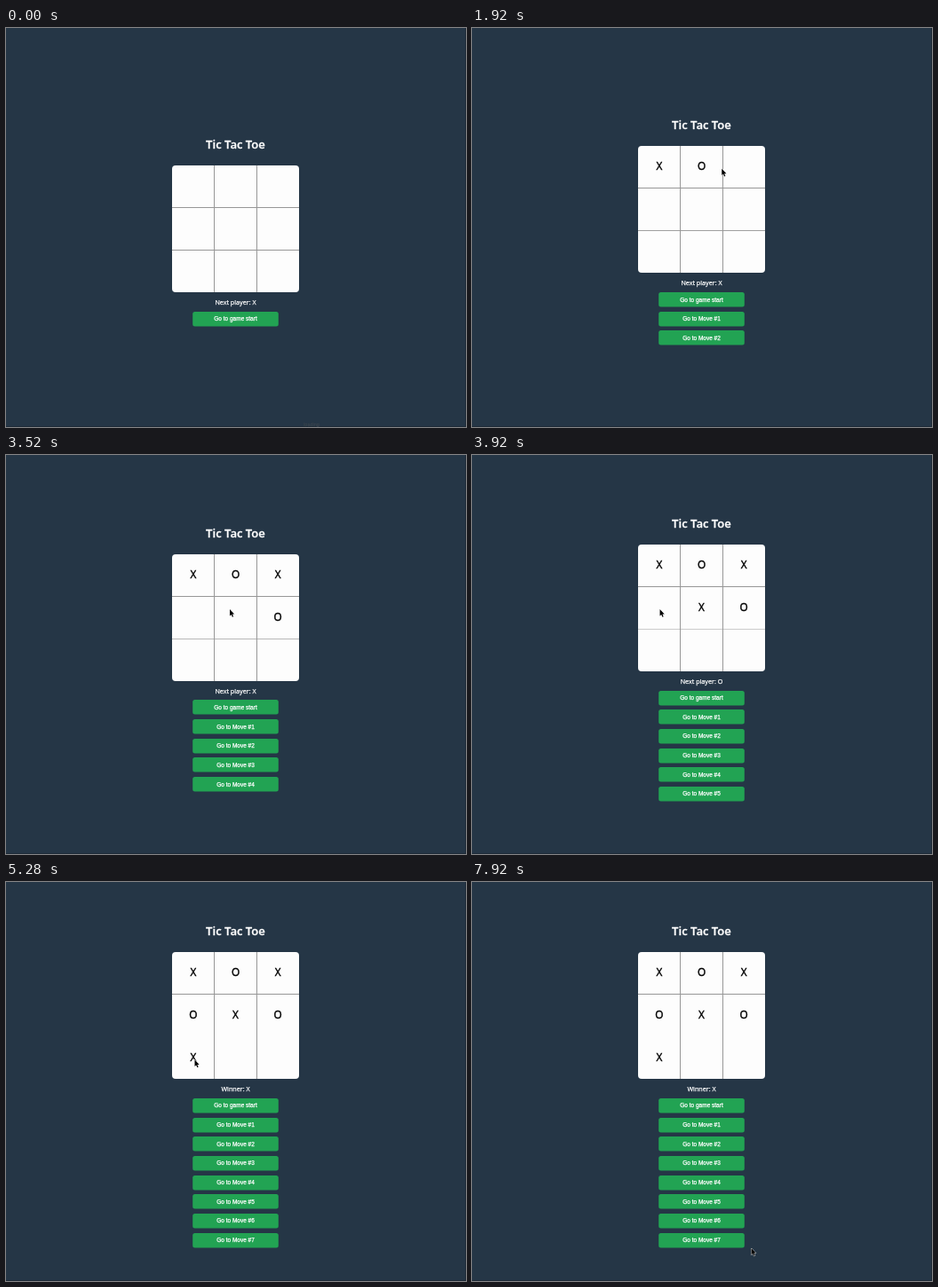
Animation, 518 px wide and 450 px high, one loop 8 s. Source, as an HTML page with a canvas:

```html
<!DOCTYPE html>
<html lang="en">
<head>
<meta charset="utf-8">
<title>Tic Tac Toe</title>
<style>
  html, body { margin: 0; width: 100%; height: 100%; overflow: hidden; background: #253646; }
  canvas { display: block; width: 518px; height: 450px; }
</style>
</head>
<body>
<canvas id="stage"></canvas>
<script>
const W = 518, H = 450, LOOP = 8000, STEP = 80;
const LEFT = 187, SIZE = 143, CELL = SIZE / 3, MID = 258.5;
const ROW = 21.67;
const SANS = '"Open Sans", "Noto Sans", sans-serif';
const ARIAL = '"Liberation Sans", Arial, sans-serif';

// Squares in playing order and the times they are clicked
const squares = [0, 1, 2, 5, 4, 3, 6];
const clicks = [1280, 1920, 2480, 3200, 3760, 4240, 5280];

// Pointer glides: start, duration, end x, end y
const entry = [52, 12];
const glides = [
  [320, 720, 225, 189], [1280, 400, 264, 170], [1840, 480, 305, 143],
  [2880, 320, 306, 180], [3200, 320, 252, 174], [3760, 240, 210, 174],
  [4800, 320, 212.5, 200.5], [5360, 720, 258, 194], [6640, 160, 308, 194],
  [7360, 240, 406, 290], [7600, 320, 314.5, 413]
];

const canvas = document.getElementById('stage');
const ctx = canvas.getContext('2d');
const ratio = window.devicePixelRatio || 1;
canvas.width = W * ratio;
canvas.height = H * ratio;

function box(x, y, w, h, r, fill) {
  ctx.fillStyle = fill;
  ctx.beginPath();
  ctx.roundRect(x, y, w, h, r);
  ctx.fill();
}

// A thin outline gives the letters their fuller weight
function text(str, x, y, font, fill, weight = 0.25) {
  ctx.font = font;
  ctx.fillStyle = ctx.strokeStyle = fill;
  ctx.lineWidth = weight;
  ctx.strokeText(str, x, y);
  ctx.fillText(str, x, y);
}

function drawBoard(top, count) {
  box(LEFT, top, SIZE, SIZE, 4, '#fdfdfd');
  ctx.fillStyle = '#979797';
  for (let i = 1; i < 3; i++) {
    const gap = Math.floor(i * CELL);
    ctx.globalAlpha = 1;
    ctx.fillRect(LEFT + gap, top, 1, SIZE);
    // The lower line fades as the game goes on
    if (i === 2) ctx.globalAlpha = 1 - (count / squares.length) ** 2;
    ctx.fillRect(LEFT, top + gap, SIZE, 1);
  }
  ctx.globalAlpha = 1;
  for (let i = 0; i < count; i++) {
    const col = squares[i] % 3, row = Math.floor(squares[i] / 3);
    text(i % 2 ? 'O' : 'X', LEFT + (col + 0.5) * CELL, top + row * CELL + 27.4,
      '500 11.8px ' + SANS, '#000', 0.45);
  }
}

function drawButton(label, y) {
  box(210.2, Math.round(y), 96.6, 16.6, 2.5, '#22a353');
  text(label, MID, y + 10.5, '6.5px ' + ARIAL, '#fff');
}

function pointerAt(t) {
  if (t < glides[0][0]) return null;
  let [x, y] = entry;
  for (const [start, span, endX, endY] of glides) {
    const u = Math.min(1, Math.max(0, (t - start) / span));
    const k = 1 - (1 - u) ** 3;
    x += (endX - x) * k;
    y += (endY - y) * k;
  }
  return [x, y];
}

function drawPointer(x, y) {
  const shape = new Path2D('M0 0V7.4L1.7 5.9L2.9 8.8L4.1 8.3L2.9 5.5H5.2Z');
  ctx.save();
  ctx.translate(x, y);
  ctx.lineWidth = 1;
  ctx.strokeStyle = 'rgba(255,255,255,.85)';
  ctx.stroke(shape);
  ctx.fillStyle = '#000';
  ctx.fill(shape);
  ctx.restore();
}

function draw(t) {
  const count = clicks.filter(c => c <= t).length;
  const lift = count * ROW / 2;
  ctx.setTransform(ratio, 0, 0, ratio, 0, 0);
  ctx.textAlign = 'center';
  ctx.lineJoin = 'round';
  ctx.fillStyle = '#253646';
  ctx.fillRect(0, 0, W, H);
  ctx.fillStyle = '#1d2a36';
  ctx.fillRect(0, H - 1, W, 1);
  ctx.fillRect(W - 1, 0, 1, H);
  if (t < 320) text('loading', 344, 448.5, '5.5px ' + ARIAL, '#37424c');

  text('Tic Tac Toe', MID, 136 - lift, '600 13.1px ' + SANS, '#fff', 0.3);
  drawBoard(Math.round(155 - lift), count);
  const status = count === squares.length ? 'Winner: X'
    : 'Next player: ' + (count % 2 ? 'O' : 'X');
  text(status, MID, 312 - lift, '500 7.2px ' + SANS, '#fff');
  for (let i = 0; i <= count; i++) {
    drawButton(i ? 'Go to Move #' + i : 'Go to game start', 319.8 - lift + i * ROW);
  }
  const p = pointerAt(t);
  if (p) drawPointer(p[0], p[1]);
}

const start = performance.now();
function tick() {
  const t = (performance.now() - start) % LOOP;
  draw(Math.floor(t / STEP) * STEP);
  requestAnimationFrame(tick);
}
tick();
</script>
</body>
</html>
```
